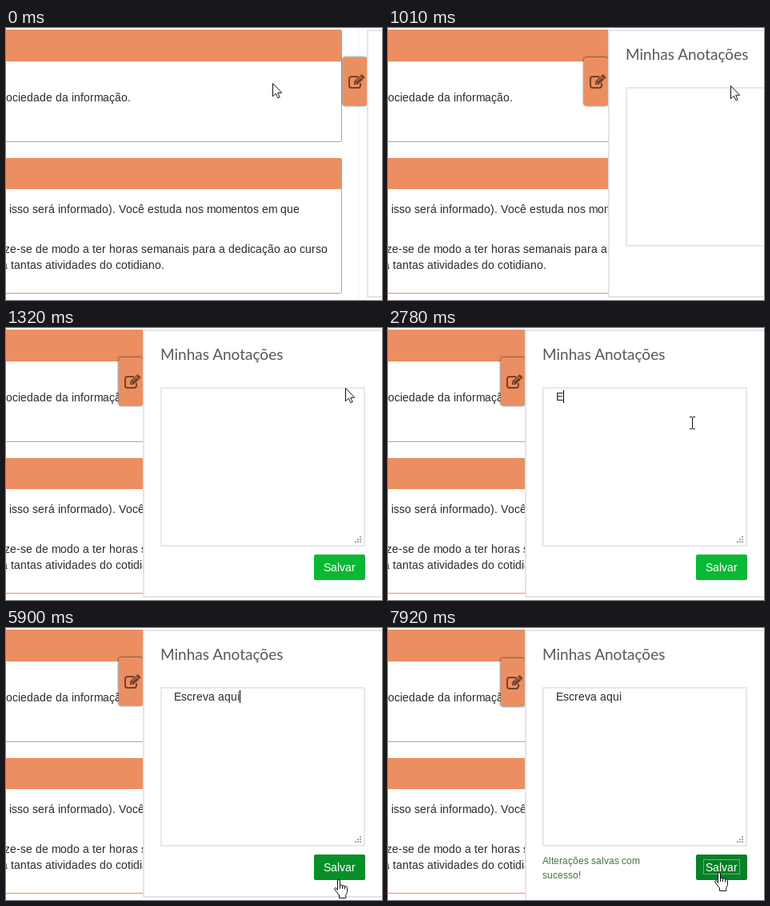
Animation of 470 by 341 pixels, one loop 8.09 s. Source, as an HTML page:

```html
<!DOCTYPE html>
<html lang="pt">
<head>
<meta charset="utf-8">
<title>Minhas Anotações</title>
<style>
  html, body { margin: 0; width: 100%; height: 100%; overflow: hidden; background: #fff; }
  svg { display: block; width: 470px; height: 341px; }
  text { font: 14px "Liberation Sans", Arial, sans-serif; fill: #2b2b2b; white-space: pre; }
  #title { font: 19px Lato, sans-serif; fill: #585858; }
  #message text { font-size: 12px; fill: #3c763d; }
  #button text { fill: #fff; }
  #tab { filter: drop-shadow(0 0 1.8px #1a1a1a); }
  .card { fill: #fff; stroke: #eb8f62; }
  .orange { fill: #eb8f62; }
  .cursor { fill: #fff; stroke: #111; stroke-linejoin: round; }
</style>
</head>
<body>
<svg viewBox="0 0 470 341">
  <path d="M440.5 0V341" stroke="#f1f1f1"/>

  <rect class="card" x="-10.5" y="2.5" width="430" height="140" rx="2"/>
  <path class="orange" d="M0 2H418l2 2V42H0z"/>
  <rect class="card" x="-10.5" y="163.5" width="430" height="169" rx="2"/>
  <path class="orange" d="M0 163H418l2 2V202H0z"/>
  <text x="0" y="92">ociedade da informação.</text>
  <text x="4" y="232">isso será informado). Você estuda nos momentos em que</text>
  <text x="-2" y="282">ze-se de modo a ter horas semanais para a dedicação ao curso</text>
  <text x="-6" y="302">a tantas atividades do cotidiano.</text>

  <g id="drawer">
    <g id="handle">
      <rect id="tab" class="orange" x="-30" y="37" width="30" height="60" rx="3"/>
      <g transform="translate(-23 58)" fill="none" stroke="#74412a">
        <path stroke-width="2" d="M12 3H4a3 3 0 0 0-3 3v8a3 3 0 0 0 3 3h8a3 3 0 0 0 3-3v-3"/>
        <path fill="#74412a" stroke="none" d="M7 13V9L15.5.7q1-.9 2 0l2.4 2.4q.8 1 0 2L11.3 13z"/>
        <path stroke="#eb8f62" d="M10 8.8L15 3.9M14 2.2l4 4M8.2 10.2l1.8 1.7"/>
      </g>
    </g>
    <rect id="panel" x="1" y="3" width="299" height="334" fill="#fff" stroke="#e4e4e4" stroke-width="2"/>
    <text id="title" x="22" y="40">Minhas Anotações</text>
    <rect x="23" y="75" width="254" height="198" fill="#fff" stroke="#e8e8e8" stroke-width="2"/>
    <path id="grip" fill="#a8a8a8"/>
    <text id="note" x="39" y="91">Escreva aqui</text>
    <rect id="caret" y="78" width="1" height="16" fill="#000"/>
    <g id="message">
      <text x="22" y="296">Alterações salvas com</text>
      <text x="22" y="314">sucesso!</text>
    </g>
    <g id="button">
      <rect id="face" x="214" y="284" width="64" height="32" rx="2"/>
      <rect id="focus" x="223.5" y="290.5" width="45" height="18" fill="none" stroke="#fff" stroke-opacity=".8" stroke-dasharray="1 1"/>
      <text x="226" y="305">Salvar</text>
    </g>
  </g>

  <g id="arrow" class="cursor">
    <path d="M.5.5V16.7L4.3 13.2L6.9 18.7L9.2 17.7L6.7 12.2H11.7z"/>
  </g>
  <g id="hand" class="cursor">
    <g transform="translate(-7 -1)">
      <path d="M4.500 13.500V2a1.500 1.500 0 0 1 3 0V8.500a1.500 1.300 0 0 1 3 0V9a1.500 1.300 0 0 1 3 .3V10a1.500 1.300 0 0 1 3 .5V15.500q0 2-1.700 4v4H6.500V20L1 13q-.9-1.700.5-2.300q1.500-.2 3 2.800z"/>
      <path fill="none" d="M7.5 8v4M10.5 9v3M13.5 10v2.5"/>
    </g>
  </g>
  <g id="beam">
    <path fill="none" stroke="#111" d="M-3 -7.5H0M1 -7.5H4M.5 -7V7M-3 7.5H0M1 7.5H4"/>
  </g>
</svg>
<script>
const LOOP = 8090, TICK = 77.7;
const NOTE = 'Escreva aqui';
const KEY_TIMES = [2780, 3010, 3250, 3330, 3560, 3730, 3790, 3940, 4030, 4250, 4330, 4480];
const CARET_ON = [[1700, 2240], [2780, 4950], [5430, 5970], [6600, 7070]];
// Pointer path: tick, x, y
const PATH = [
  [0, 333, 69], [8, 430, 66], [11, 432, 70], [13, 428, 72], [17, 424, 75], [18, 424, 75],
  [19, 380, 119], [65, 380, 119], [71, 402, 225], [75, 419, 312], [76, 417, 316],
  [80, 415, 307], [105, 415, 307]
];

const $ = id => document.getElementById(id);
const show = (id, on) => $(id).setAttribute('display', on ? 'inline' : 'none');
const move = (id, x, y) => $(id).setAttribute('transform', `translate(${x} ${y})`);
const within = (v, a, b) => v >= a && v < b;

// Set glyphs on whole pixels, as hinted screen text does.
const pen = document.createElement('canvas').getContext('2d');
function snap(el) {
  const size = parseFloat(getComputedStyle(el).fontSize);
  pen.font = `${size}px "Liberation Sans", Arial, sans-serif`;
  let x = +el.getAttribute('x');
  const stops = [x];
  for (const ch of el.textContent) {
    x += Math.min(11, Math.round(pen.measureText(ch).width));
    stops.push(x);
  }
  el.setAttribute('x', stops.join(' '));
  return stops;
}

let noteStops;
document.querySelectorAll('text:not(#title)').forEach(el => {
  const stops = snap(el);
  if (el.id === 'note') noteStops = stops;
});

let dots = '';
for (let row = 0; row < 3; row++)
  for (let col = 0; col <= row; col++)
    dots += `M${271 - col * 3} ${261 + row * 3}h2v2h-2z`;
$('grip').setAttribute('d', dots);

function pointerAt(tick) {
  const i = Math.max(1, PATH.findIndex(p => p[0] >= tick));
  const [t0, x0, y0] = PATH[i - 1], [t1, x1, y1] = PATH[i];
  const u = (tick - t0) / (t1 - t0);
  return [Math.round(x0 + (x1 - x0) * u), Math.round(y0 + (y1 - y0) * u)];
}

function drawerAt(tick) {
  const p = Math.min(1, Math.max(0, (tick * TICK - 777) / 400));
  return Math.round(451 - 280 * (0.5 - Math.cos(Math.PI * p) / 2));
}

function render(t) {
  const tick = Math.floor((t + 18) / TICK);
  const left = drawerAt(tick);
  const [x, y] = pointerAt(tick);
  const saved = t >= 7920, pressed = t >= 7460;

  move('drawer', left, 0);
  move('handle', 0, saved ? 1 : 0);
  $('panel').setAttribute('height', saved ? 400 : 334);
  show('message', saved);

  const typed = KEY_TIMES.filter(k => t >= k).length;
  $('note').textContent = NOTE.slice(0, typed);
  $('caret').setAttribute('x', noteStops[typed]);
  show('caret', CARET_ON.some(([a, b]) => within(t, a, b)));

  const onTab = within(x, left - 30, left) && within(y, 37, 97);
  const onButton = within(x, left + 214, left + 278) && within(y, 284, 317);
  const onNote = within(x, left + 24, left + 276) && within(y, 76, 272);
  $('face').setAttribute('fill', pressed ? '#078027' : onButton ? '#088f2a' : '#0ab834');
  show('focus', pressed);

  const kind = onTab || onButton ? 'hand' : onNote ? 'beam' : 'arrow';
  for (const id of ['arrow', 'hand', 'beam']) {
    show(id, id === kind);
    move(id, x, y);
  }
}

const start = performance.now();
function frame() {
  render((performance.now() - start) % LOOP);
  requestAnimationFrame(frame);
}
frame();
</script>
</body>
</html>
```
